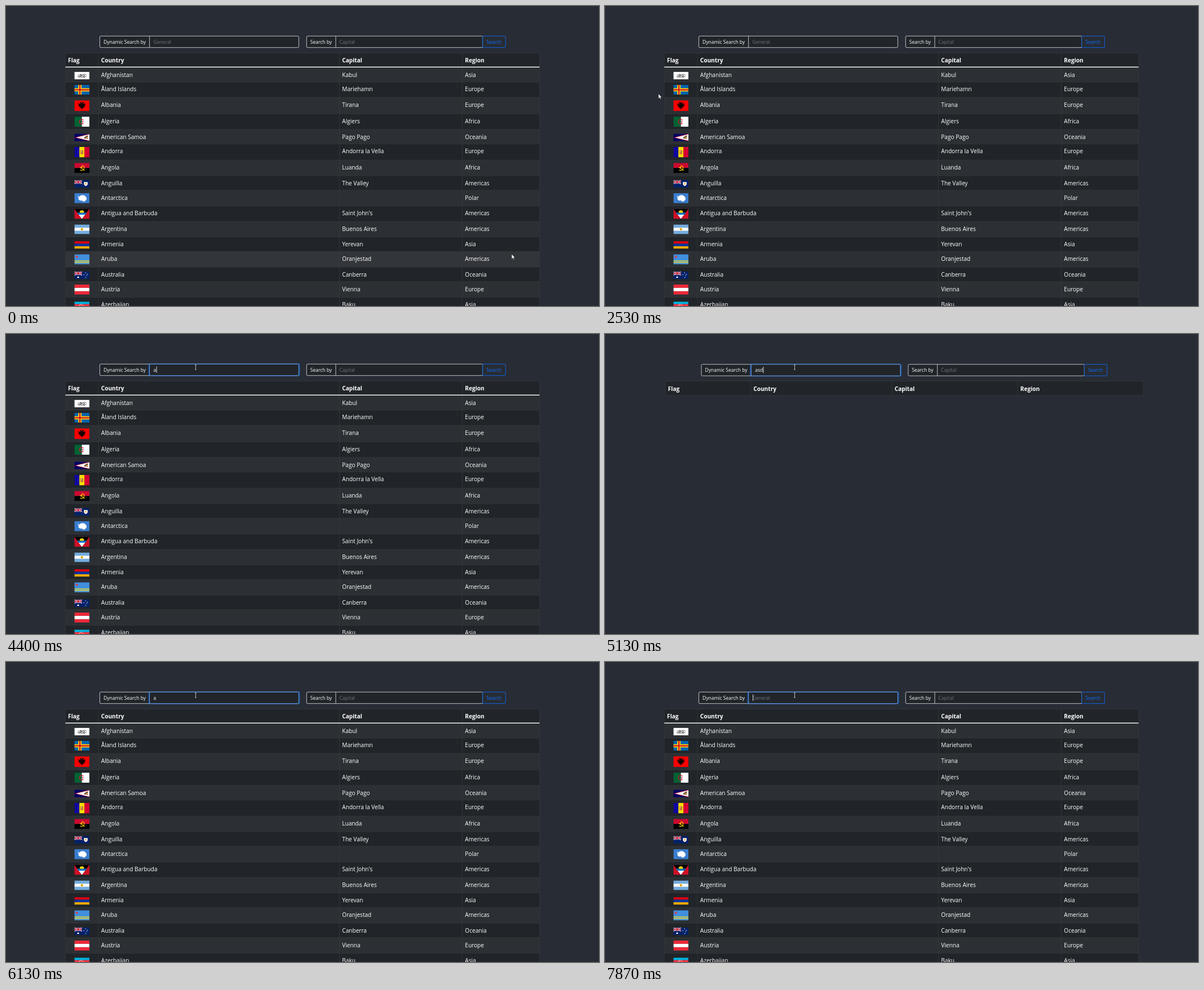
Animation, 1052 px wide and 532 px high, one loop 8 s. Source, as an HTML page:

```html
<!DOCTYPE html>
<html lang="en">
<head>
<meta charset="utf-8">
<title>Country search</title>
<style>
  html, body { margin: 0; width: 100%; height: 100%; overflow: hidden; background: #282c34; }
  #stage { display: block; width: 1052px; height: 532px; font: 10.1px "Open Sans", "Noto Sans", sans-serif; fill: #fff; }
  .form { font-size: 8.5px; }
  .head { font-weight: 700; }
  .hint { fill: #6c757d; }
  .blue { fill: #0d6efd; }
</style>
</head>
<body>
<svg id="stage" viewBox="0 0 1052 532"></svg>
<script>
const LOOP = 8000, STEP = 200 / 3, TOP = 109;
const stage = document.getElementById('stage');
const pen = document.createElement('canvas').getContext('2d');
pen.font = '8.5px "Open Sans", "Noto Sans", sans-serif';

const R = (x, y, w, h, fill) => `<rect x="${x}" y="${y}" width="${w}" height="${h}" fill="${fill}"/>`;
const C = (x, y, r, fill) => `<circle cx="${x}" cy="${y}" r="${r}" fill="${fill}"/>`;
const P = (d, fill) => `<path d="${d}" fill="${fill}"/>`;
const L = (d, stroke, w) => `<path d="${d}" fill="none" stroke="${stroke}" stroke-width="${w}"/>`;
const T = (x, y, text, cls = '') => `<text x="${x}" y="${y}" class="${cls}">${text}</text>`;

// Flags live in a 60 x 40 box
const bands = (...c) => c.map((k, i) => R(0, i * 40 / c.length, 60, 40 / c.length, k)).join('');
const bars = (...c) => c.map((k, i) => R(i * 60 / c.length, 0, 60 / c.length, 40, k)).join('');
const jack = L('M0 0L30 20M30 0L0 20', '#fff', 4) + L('M0 0L30 20M30 0L0 20', '#c8102e', 1.6) +
  L('M15 0V20M0 10H30', '#fff', 7) + L('M15 0V20M0 10H30', '#c8102e', 4);
const shield = (fill, dot) => P('M38 11H53V22Q52 29 45.500 32Q39 29 38 22Z', fill) + C(45.5, 20, 4, dot);

const flags = {
  af: bands('#fff') + L('M12 25Q18 30 24 22T36 24T48 20M14 16L20 20L24 13L30 19L35 12L40 18L47 13M17 28H43M26 12V27M38 14V26', '#222', 2),
  ax: bands('#0064ae') + L('M22 0V40M0 20H60', '#ffd300', 13) + L('M22 0V40M0 20H60', '#d21034', 5),
  al: bands('#f00') + P('M30 10L25 6L21 9L25 12L24 15L16 10L18 24L24 23L21 30L27 28L30 35L33 28L39 30L36 23L42 24L44 10L36 15L35 12L39 9L35 6Z', '#120000'),
  dz: bars('#006233', '#fff') + L('M36 14A9 9 0 1 0 36 26', '#d21034', 3) + P('M29 20L37 16L34 20L37 24Z', '#d21034'),
  as: bands('#000066') + P('M0 20L60 0V40Z', '#bd1021') + P('M7 20L60 3V37Z', '#fff') + P('M37 23L46 13L56 8L52 20L55 28L46 26Z', '#6b4a3a') + C(49, 22, 3, '#ffc221'),
  ad: bars('#10069f', '#fedd00', '#d50032') + R(24, 13, 12, 15, '#c6803d') + R(26, 15, 4, 5, '#e6b64a') + R(30, 20, 4, 6, '#d0783f'),
  ao: bands('#cc092f', '#000') + L('M30 10A10 10 0 1 1 23 28M22 17L41 30', '#ffcb00', 2.6) + C(29, 17, 3, '#ffcb00'),
  ai: bands('#012169') + jack + shield('#fff', '#f5a33b'),
  aq: bands('#3a7dce') + P('M13 8L18 14L27 8L38 8L47 15L49 24L42 32L34 34L31 29L23 30L16 24L17 19Z', '#fff'),
  ag: bands('#ce1126') + P('M0 0H60L30 40Z', '#000') + P('M22 19L25 15L24 11L29 12L30 7L31 12L36 11L35 15L38 19Z', '#fcd116') + P('M10 15H50L42 24H18Z', '#0072c6') + P('M21 15A9 9 0 0 1 39 15Z', '#fcd116') + P('M17 23H43L30 40Z', '#fff'),
  ar: bands('#74acdf', '#fff', '#74acdf') + C(30, 20, 5, '#f6b40e') + C(30, 20, 2.5, '#c98a20'),
  am: bands('#d90012', '#0033a0', '#f2a800'),
  aw: bands('#418fde') + R(0, 25, 60, 3, '#fbe122') + R(0, 31, 60, 3, '#fbe122') + P('M10 3L12 8L17 10L12 12L10 17L8 12L3 10L8 8Z', '#ef3340'),
  au: bands('#012169') + jack + C(15, 31, 4, '#fff') + [[45, 7], [38, 18], [52, 15], [45, 33], [49, 22]].map(([x, y]) => C(x, y, 1.9, '#fff')).join(''),
  at: bands('#ed2939', '#fff', '#ed2939'),
  az: bands('#00b5e2', '#ef3340', '#509e2f') + L('M31 16A6 6 0 1 0 31 24', '#fff', 2) + C(34, 20, 2, '#fff'),
  bs: bands('#00778b', '#ffc72c', '#00778b') + P('M0 0L27 20L0 40Z', '#000'),
  bh: bands('#ce1126') + P('M0 0H19L28 4L19 8L28 12L19 16L28 20L19 24L28 28L19 32L28 36L19 40H0Z', '#fff'),
  bd: bands('#006a4e') + C(27, 20, 12, '#f42a41'),
  bb: bars('#00267f', '#ffc726', '#00267f') + L('M30 11V29M25 14Q25 22 30 23Q35 22 35 14', '#000', 2),
  bz: bands('#003f87') + R(0, 0, 60, 4, '#ce1126') + R(0, 36, 60, 4, '#ce1126') + C(30, 20, 13, '#fff') + C(30, 20, 8, '#5d9b68'),
  bm: bands('#c8102e') + R(0, 0, 30, 20, '#012169') + jack + shield('#fff', '#c8102e'),
  bt: bands('#ff4e12') + P('M0 0H60L0 40Z', '#ffd520') + L('M14 32Q20 21 29 23T46 8', '#fff', 5),
  bo: bands('#d52b1e', '#f9e300', '#007934') + C(30, 20, 5, '#b58b35'),
  bq: bands('#fff') + P('M60 4V40H6Z', '#012a87') + P('M0 0H24L0 16Z', '#f9d90f') + C(20, 20, 4, '#dc171d')
};

// country, capital, region, flag, flag height
const rows = [
  ['Afghanistan', 'Kabul', 'Asia', 'af', 13.3],
  ['Åland Islands', 'Mariehamn', 'Europe', 'ax', 17.4],
  ['Albania', 'Tirana', 'Europe', 'al', 19],
  ['Algeria', 'Algiers', 'Africa', 'dz', 17.8],
  ['American Samoa', 'Pago Pago', 'Oceania', 'as', 13.3],
  ['Andorra', 'Andorra la Vella', 'Europe', 'ad', 18.6],
  ['Angola', 'Luanda', 'Africa', 'ao', 17.8],
  ['Anguilla', 'The Valley', 'Americas', 'ai', 13.3],
  ['Antarctica', '', 'Polar', 'aq', 17.8],
  ['Antigua and Barbuda', "Saint John's", 'Americas', 'ag', 17.8],
  ['Argentina', 'Buenos Aires', 'Americas', 'ar', 17.1],
  ['Armenia', 'Yerevan', 'Asia', 'am', 13.3],
  ['Aruba', 'Oranjestad', 'Americas', 'aw', 17.8],
  ['Australia', 'Canberra', 'Oceania', 'au', 13.3],
  ['Austria', 'Vienna', 'Europe', 'at', 17.8],
  ['Azerbaijan', 'Baku', 'Asia', 'az', 13.3],
  ['Bahamas', 'Nassau', 'Americas', 'bs', 13.3],
  ['Bahrain', 'Manama', 'Asia', 'bh', 16],
  ['Bangladesh', 'Dhaka', 'Asia', 'bd', 16],
  ['Barbados', 'Bridgetown', 'Americas', 'bb', 17.8],
  ['Belize', 'Belmopan', 'Americas', 'bz', 16],
  ['Bermuda', 'Hamilton', 'Americas', 'bm', 13.3],
  ['Bhutan', 'Thimphu', 'Asia', 'bt', 17.8],
  ['Bolivia (Plurinational State of)', 'Sucre', 'Americas', 'bo', 18.1],
  ['Bonaire, Sint Eustatius and Saba', 'Kralendijk', 'Americas', 'bq', 17.8]
];

// Column edges, by length of the search text
const full = [105.3, 164, 591.5, 809.5, 946.5];
const columns = [full, full, [105.3, 172.5, 602, 852, 946.5], [107, 258.5, 509, 732, 955]];

const edits = [[0, ''], [4400, 'a'], [4730, 'as'], [5130, 'asd'], [5670, 'as'], [6130, 'a'], [6800, 'as'], [7200, 'a'], [7530, '']];
const blinks = [3470, 4000, 4400, 5670, 6200, 6730, 6800, 7330, 7870];
const path = [
  [0, 897, 440], [330, 585, 322], [930, 585, 322], [1200, 139.5, 154], [1730, 139.5, 154],
  [2000, 92, 154], [2270, 150, 155], [2530, 95, 155], [2730, 85, 200], [2870, 130, 211],
  [3270, 348.5, 65], [3470, 341, 62], [3670, 336.5, 59], [LOOP, 336.5, 59]
];

function pointer(t) {
  t = Math.floor((t + 4) / STEP) * STEP;
  const i = Math.max(1, path.findIndex(k => k[0] >= t));
  const [a, b] = [path[i - 1], path[i]];
  const u = (t - a[0]) / (b[0] - a[0]);
  return [a[1] + (b[1] - a[1]) * u, a[2] + (b[2] - a[2]) * u];
}

function table(query, mx, my) {
  const cols = columns[query.length], left = cols[0], width = cols[4] - left;
  const found = rows.filter(r => r.slice(0, 3).join('\n').toLowerCase().includes(query));
  const dy = found.length ? 0 : 0.5;
  let y = TOP, out = R(left, 83.5, width, TOP - 83.5, '#212529'), lines = `M${left} 83.500H${cols[4]}`;
  ['Flag', 'Country', 'Capital', 'Region'].forEach((h, i) => out += T(cols[i] + 4.8, 100.2 + dy, h, 'head'));
  found.forEach(([country, capital, region, code, fh], i) => {
    if (y > 532) return;
    const h = Math.max(25.85, fh + 9.95);
    const hover = mx > left && mx < cols[4] && my >= y && my < y + h;
    out += R(left, y, width, h, hover ? '#323539' : i % 2 ? '#212529' : '#2c3034');
    out += `<svg x="${(left + cols[1]) / 2 - 13.3}" y="${y + h - 4.9 - fh}" width="26.6" height="${fh}" viewBox="0 0 60 40" preserveAspectRatio="none">${flags[code]}</svg>`;
    [country, capital, region].forEach((s, j) => out += T(cols[j + 1] + 4.8, y + 16.6, s));
    y += h;
    lines += `M${left} ${y}H${cols[4]}`;
  });
  lines += cols.map(x => `M${x} 83.500V${y}`).join('');
  if (!found.length) lines += `M${left} ${y}H${cols[4]}`;
  out += L(lines, '#373b3e', 0.7);
  return out + (found.length ? R(left, 107.6, width, 1.4, '#fff') : '');
}

function box(x, w, stroke, fill = '#212529', sw = 0.9) {
  return `<rect x="${x}" y="53.3" width="${w}" height="20.4" rx="1.8" fill="${fill}" stroke="${stroke}" stroke-width="${sw}"/>`;
}

function form(query, focus, caret) {
  const shift = query.length > 2 ? 'translate(4.6 .5)' : '';
  const end = 262 + pen.measureText(query).width;
  return `<g class="form" transform="${shift}">` +
    box(166.4, 353, '#ced4da') + L('M254.600 53.300V73.700', '#ced4da', 0.9) +
    (focus ? `<g opacity=".4">${box(253.4, 267.3, '#0d6efd', 'none', 2.6)}</g>` + box(254.6, 264.8, '#6ea4f0') : '') +
    T(173, 66.6, 'Dynamic Search by') + T(261.6, 66.6, query || 'General', query ? '' : 'hint') +
    (caret ? R(end, 57.5, 0.8, 11.5, '#fff') : '') +
    box(533.3, 312.5, '#ced4da') + L('M585 53.300V73.700', '#ced4da', 0.9) +
    box(845.7, 40.5, '#0d6efd', '#282c34') +
    T(539.8, 66.6, 'Search by') + T(591.5, 66.6, 'Capital', 'hint') + T(852.3, 66.6, 'Search', 'blue') + '</g>';
}

function cursor(x, y) {
  const typing = x > 255 && x < 519 && y > 53 && y < 75;
  const shape = typing
    ? L('M-1.500 -4H1.500M0 -4V4M-1.500 4H1.500', '#d8dadc', 0.8)
    : '<path d="M0 0V8.600L2 6.700L3.400 9.800L4.700 9.200L3.300 6.200H6Z" fill="#fff" stroke="#111" stroke-width=".5"/>';
  return `<g transform="translate(${x} ${y})">${shape}</g>`;
}

let shown = '';
function draw(now) {
  const t = now % LOOP;
  const query = edits.filter(e => e[0] <= t).pop()[1];
  const focus = t >= blinks[0];
  const caret = blinks.filter(b => b <= t).length % 2 === 1;
  const [x, y] = pointer(t);
  const key = [query, focus, caret, x, y].join();
  if (key !== shown) {
    stage.innerHTML = table(query, x, y) + form(query, focus, caret) + cursor(x, y);
    shown = key;
  }
  requestAnimationFrame(draw);
}
draw(0);
</script>
</body>
</html>
```
